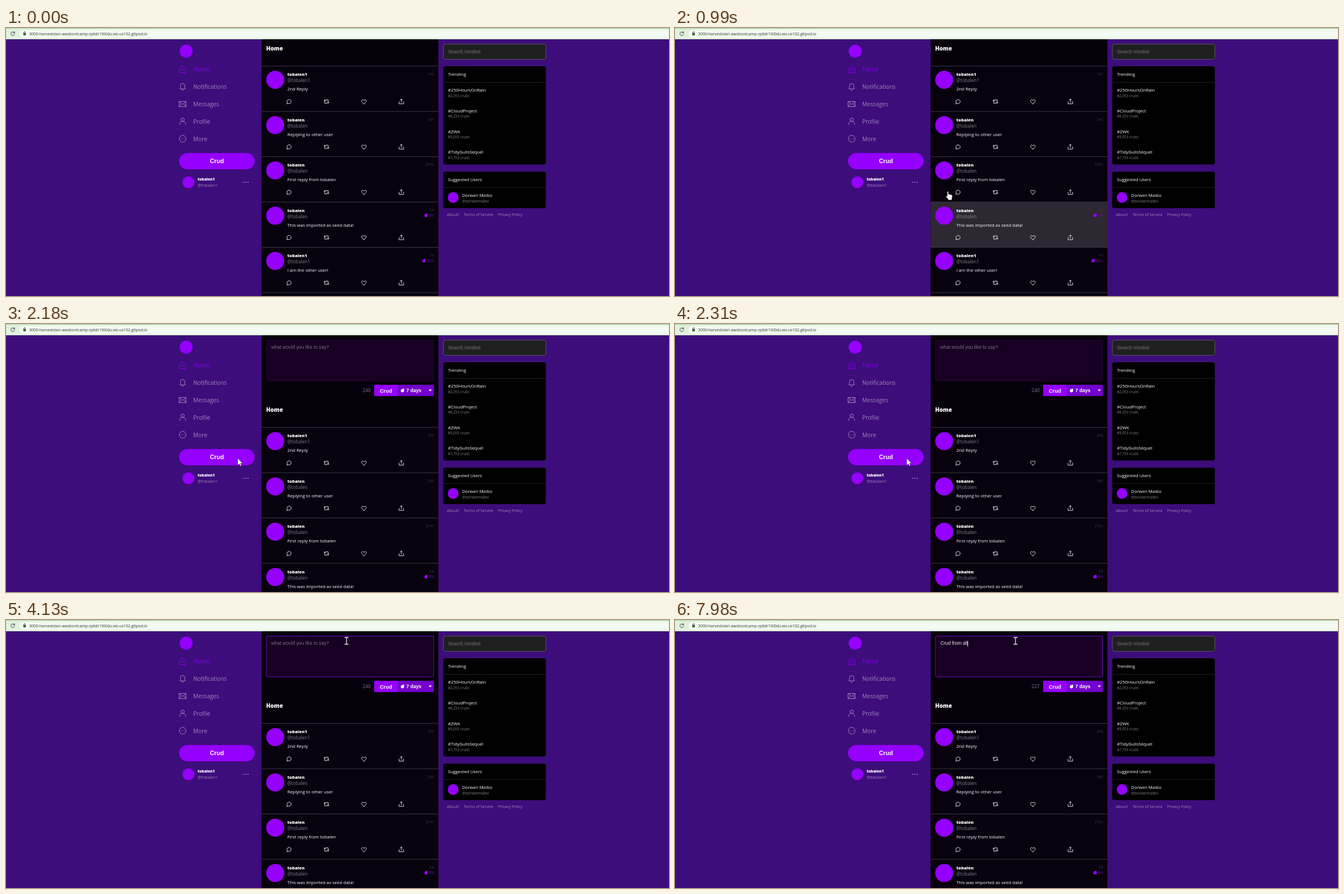
These frames come from a looping animation (1176x476 px, 8000 ms). An HTML page:

```html
<!DOCTYPE html>
<html lang="en">
<head>
<meta charset="utf-8">
<title>Feed</title>
<style>
  html, body { margin: 0; width: 100%; height: 100%; overflow: hidden; background: #3d0d7b; }
  svg { display: block; font-family: "Open Sans", "Noto Sans", sans-serif; }
  text { white-space: pre; }
  .field { font-family: "Liberation Sans", Arial, sans-serif; }
  .icon { fill: none; stroke-width: 1; stroke-linejoin: round; stroke-linecap: round; }
</style>
</head>
<body>
<script>
const ACCENT = '#9500ff', NAV = '#9e86bd', GREY = '#837f86', LOOP = 8000;

const text = (x, y, str, size, fill = '#fff', attrs = '') =>
  `<text x="${x}" y="${y}" font-size="${size}" fill="${fill}" ${attrs}>${str}</text>`;
const rect = (x, y, w, h, fill, attrs = '') =>
  `<rect x="${x}" y="${y}" width="${w}" height="${h}" fill="${fill}" ${attrs}/>`;
const dot = (x, y, r, fill = ACCENT) => `<circle cx="${x}" cy="${y}" r="${r}" fill="${fill}"/>`;
const icon = (x, y, d, stroke, attrs = '') =>
  `<path class="icon" transform="translate(${x} ${y})" d="${d}" stroke="${stroke}" ${attrs}/>`;
const bomb = (x, y, fill) =>
  `<path transform="translate(${x} ${y})" fill="${fill}" d="M-3 0a3 3 0 0 1 3-2.6L3-3.4 2.6-1A3 3 0 1 1-3 0Z"/>`;
const BOLD = 'font-weight="800"', RIGHT = 'text-anchor="end"', MIDDLE = 'text-anchor="middle"';

function browserBar() {
  return rect(0, 0, 1176, 20, '#e0f2de') + rect(0, 0, 1176, 1.5, '#b5dcb0') +
    rect(24, 2.5, 1180, 15, '#f2faf1', 'rx="7.5"') +
    icon(12, 10, 'M2.8-1.6A3.3 3.3 0 1 0 3.3.6M3.2-3.6v2.3H.9', '#3c4043', 'stroke-width="1.1"') +
    rect(30.7, 9, 4.6, 4, '#4a4f4a', 'rx=".6"') +
    icon(33, 9, 'M-1.4 0v-1a1.4 1.4 0 0 1 2.8 0v1', '#4a4f4a') +
    text(41, 12.6, '3000-harvestolan-awsbootcamp-rp6dr1t00du.ws-us102.gitpod.io', 6.95, '#30353a');
}

function sidebar() {
  const items = [
    ['Home', 'M-5.5-2 0-6 5.5-2V6h-11ZM0 2.5C-4-.5-1.5-2 0-.5 1.5-2 4-.5 0 2.5'],
    ['Notifications', 'M-5 3.5C-3.5 2-3.8 0-3.8-2a3.8 3.8 0 0 1 7.6 0c0 2-.3 4 1.2 5.5ZM-1.5 5.3a1.6 1.6 0 0 0 3 0'],
    ['Messages', 'M-6-4.5H6v9H-6ZL0 .8 6-4.5M-6 4.5-2-.8M6 4.5 2-.8'],
    ['Profile', 'M0 0a3 3 0 1 0 0-6 3 3 0 0 0 0 6M-5.5 5.8C-5.5 2-3 0 0 0S5.5 2 5.5 5.8'],
    ['More', 'M-6 0a6 6 0 1 0 12 0 6 6 0 1 0-12 0M-2.8 0h.1M0 0h.1M2.8 0h.1']
  ];
  return dot(319.5, 41, 11.5) +
    items.map(([name, d], i) => {
      const color = i ? NAV : '#8900ec', y = 73.5 + 30.8 * i;
      return icon(313.3, y, d, color) + text(332, y + 3.8, name, 10.1, color);
    }).join('') +
    rect(307, 222, 134, 29, ACCENT, 'rx="14.5"') +
    text(374, 240, 'Crud', 10.6, '#fff', `class="field" font-weight="700" ${MIDDLE}`) +
    dot(323.5, 274, 10.5) + text(340, 271.2, 'tobalen1', 6.7, '#fff', BOLD) +
    text(340, 282.2, '@tobalen1', 7.15, NAV) +
    [421.5, 425.5, 429.5].map(x => dot(x, 274, 1, NAV)).join('');
}

const posts = [
  ['tobalen1', '2nd Reply', '1m'],
  ['tobalen', 'Replying to other user', '3m'],
  ['tobalen', 'First reply from tobalen', '27m'],
  ['tobalen', 'This was imported as seed data!', '1h', '9d'],
  ['tobalen1', 'I am the other user!', '1h', '22h'],
  ['tobalen', '', '1h']
];

function post([user, message, age, expires], i) {
  const actions = [
    'M-3.6 3.8-3.2 1.7A3.7 3.7 0 1 1-1.4 3.4Z',
    'M-4.5-1.2-3-3l1.6 1.8M-3-3V3H1M4.5 1.2 3 3 1.4 1.2M3 3v-6H-1',
    'M0 4C-7-.5-4-5.5 0-2.2 4-5.5 7-.5 0 4Z',
    'M-4 0v4h8V0M0 1.5v-6M-2-2.6 0-4.6l2 2'
  ];
  return `<g transform="translate(0 ${67.7 + 80.45 * i})">` +
    rect(453.5, 0, 313.5, 80.4, '#08010e', 'class="post"') + rect(453.5, -.5, 313.5, 1, '#3c3645') +
    dot(477.5, 24.3, 16) + text(499, 17.7, user, 7.75, '#fff', BOLD) +
    text(499, 28.7, '@' + user, 8.1, GREY) + text(499, 43.6, message, 7.9) +
    text(759, 16.8, age, 7.1, '#413a48', `${RIGHT} class="age"`) +
    (expires ? text(759, 26.2, expires, 7.1, '#7a08c4', RIGHT) +
      bomb(expires.length > 2 ? 741.5 : 745, 23.5, ACCENT) : '') +
    actions.map((d, k) => icon(502 + 66.4 * k, 63, d, '#e4e2e6')).join('') + '</g>';
}

function composer() {
  return '<g id="composer">' +
    rect(462, 28.5, 296.5, 72.5, '#170024', 'id="box" rx="1.5"') +
    text(470.5, 44.3, 'what would you like to say?', 8.42, '#79717f', 'class="field" id="hint"') +
    text(471, 44.3, '', 8.35, '#f0edf2', 'class="field" id="typed"') +
    rect(470, 37, 1, 10, '#fff', 'id="caret"') +
    text(647, 121.2, '240', 8.6, '#5d5664', `${RIGHT} font-weight="600" id="count"`) +
    rect(653, 108, 106, 20, '#7300cc', 'rx="2"') + rect(653, 108, 42, 20, ACCENT, 'rx="2"') +
    text(674, 122, 'Crud', 9.4, '#fff', `class="field" font-weight="700" ${MIDDLE}`) +
    bomb(703.3, 118, '#fff') +
    text(710, 121.2, '7 days', 8.6, '#fff', 'class="field" font-weight="700"') +
    '<path d="M749.5 116.5h6l-3 3Z" fill="#fff"/></g>';
}

function rightColumn() {
  const trends = [['#250HoursOnRain', '2,053'], ['#CloudProject', '8,253'], ['#ZWK', '9,053'], ['#TidyGullsSequel', '7,753']];
  const panel = (y, h, title) => rect(775.5, y, 182, h, '#000', 'rx="3.5"') +
    rect(775.5, y + 28, 182, 1, '#241f28') + text(784, y + 17.3, title, 7.8);
  return rect(776, 28.5, 181.5, 27, '#1f1f1f', 'rx="3" stroke="#555"') +
    text(784, 44.6, 'Search Vondrel', 8.38, '#757575', 'class="field"') +
    panel(68, 174.5, 'Trending') +
    trends.map(([tag, n], i) => text(784, 113.4 + 36.6 * i, tag, 7.8) +
      text(784, 122.8 + 36.6 * i, `#${n} cruds`, 6.3, GREY)).join('') +
    panel(255, 65, 'Suggested Users') + dot(793, 301, 9.5) +
    text(809, 300.4, 'Dorwen Malbo', 7.8) + text(809, 309.8, '@dorwenmalbo', 6.45, GREY) +
    [['About!', 782], ['Terms of Service', 812], ['Privacy Policy', 873]]
      .map(([label, x]) => text(x, 333.8, label, 6.9, NAV)).join('');
}

const cursors = {
  arrow: '<path d="M0 0V12.2L2.8 9.7 4.7 13.8 6.6 13 4.8 9.1H8.6Z" fill="#fff" stroke="#222" stroke-width=".5"/>',
  hand: '<path d="M-1 1Q0-.6 1 1V5.2L6.5 6.3Q8 6.7 8 8.5L7 13V15.5H.3V13.8L-3.4 9.3Q-3.2 7.4-1 9Z" fill="#fff" stroke="#222" stroke-width=".5"/>',
  beam: '<path d="M-3.4-6H3.4M0-6V6M-3.4 6H3.4" fill="none" stroke="#eee" stroke-width="1.3"/>'
};

document.body.innerHTML = `<svg width="1176" height="476" viewBox="0 0 1176 476">
  ${rect(0, 0, 1176, 476, '#3d0d7b') + rect(453.5, 20, 313.5, 456, '#06000b')}
  <g id="feed">${text(461.5, 39.5, 'Home', 9.9, '#fff', BOLD) + posts.map(post).join('')}</g>
  ${composer() + sidebar() + rightColumn() + browserBar()}
  <g id="cursor">${Object.entries(cursors).map(([k, s]) => `<g id="${k}">${s}</g>`).join('')}</g></svg>`;

const $ = id => document.getElementById(id);
const postBoxes = [...document.querySelectorAll('.post')];
const firstAge = document.querySelector('.age');

// time, x, y, cursor, hovered post
const moves = [
  [860, 822, 436, 'arrow'], [920, 527, 320, 'hand', 4], [990, 484, 290, 'hand', 3],
  [1060, 460, 268, 'hand', 2], [1130, 445, 254, 'arrow', 2], [1200, 436, 247, 'arrow'],
  [1330, 428, 242, 'arrow'], [1400, 418, 241, 'arrow'], [1590, 416, 240, 'arrow'],
  [1660, 413, 239, 'arrow'], [1720, 411, 238.5, 'arrow']
];
const OPEN = 2180, LEAVE = 2710, ARRIVE = 3470, FOCUS = 3600, BLINK = 530;
const message = 'Crud from alt';
const keyTimes = [5580, 5850, 5980, 6310, 6510, 6640, 6900, 6970, 7240, 7300, 7500, 7650, 7980];

const bezier = (s, a, b, c, d) =>
  (1 - s) ** 3 * a + 3 * s * (1 - s) ** 2 * b + 3 * s * s * (1 - s) * c + s ** 3 * d;

function pointer(t) {
  if (t < LEAVE) return moves.findLast(m => m[0] <= t);
  const step = Math.min(12, Math.floor((t - LEAVE) / (ARRIVE - LEAVE) * 11 + 1.001)) / 12;
  const s = step * (2 - step);
  const x = bezier(s, 411, 440, 800, 604), y = bezier(s, 238.5, 90, 0, 37);
  const overBox = x > 462 && x < 758 && y > 28 && y < 101;
  return [t, x, y, overBox ? 'beam' : 'arrow'];
}

const show = (el, on) => el.style.display = on ? '' : 'none';

function draw(t) {
  const open = t >= OPEN, focused = t >= FOCUS;
  const at = pointer(t);
  show($('cursor'), at);
  if (at) {
    $('cursor').setAttribute('transform', `translate(${at[1]} ${at[2]})`);
    for (const kind in cursors) show($(kind), kind === at[3]);
  }
  postBoxes.forEach((box, i) => box.setAttribute('fill', at && at[4] === i ? '#2e2833' : '#08010e'));

  $('feed').setAttribute('transform', `translate(0 ${open ? 116 : 0})`);
  firstAge.textContent = open ? '2m' : '1m';
  show($('composer'), open);
  $('box').setAttribute('stroke', focused ? '#6f0abf' : '#1f082e');

  const typed = keyTimes.filter(k => k <= t).length;
  const lastKey = typed ? keyTimes[typed - 1] : FOCUS;
  $('typed').textContent = message.slice(0, typed);
  $('count').textContent = 240 - typed;
  show($('hint'), !typed);
  show($('caret'), focused && Math.floor((t - lastKey) / BLINK) % 2 === 0);
  $('caret').setAttribute('x', 470.3 + (typed ? $('typed').getComputedTextLength() : 0));
}

function frame() {
  draw(performance.now() % LOOP);
  requestAnimationFrame(frame);
}
frame();
</script>
</body>
</html>
```
